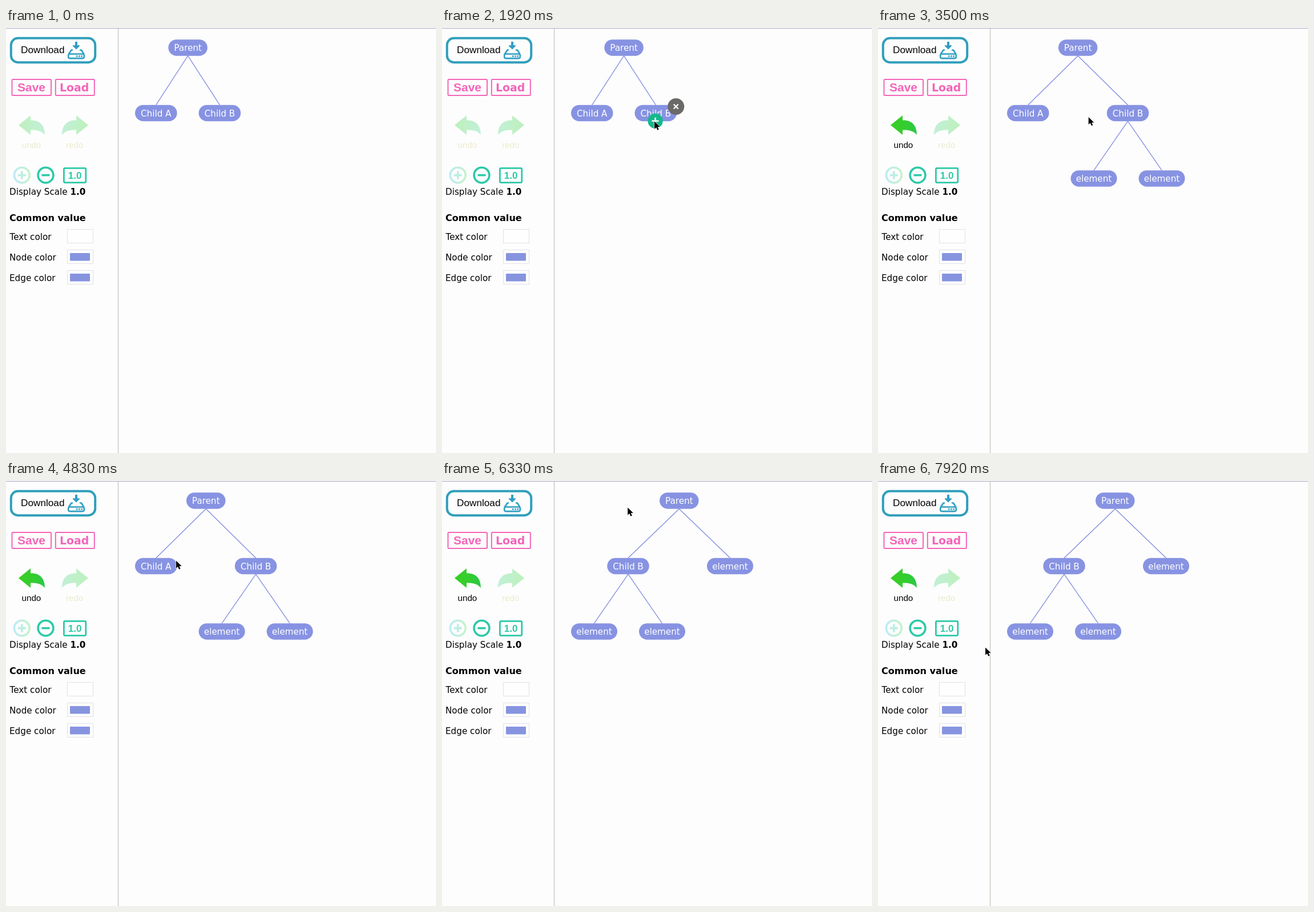
Animation of 753x744 px, one loop 8000 ms. Source, as an HTML page:

```html
<!DOCTYPE html>
<html lang="en">
<head>
<meta charset="utf-8">
<title>Tree editor</title>
<style>
  html, body { margin: 0; width: 100%; height: 100%; overflow: hidden; background: #fdfdfd; }
  svg { display: block; width: 100vw; height: 100vh; }
  text { font: 15.2px "DejaVu Sans", sans-serif; }
  .sans { font-family: "Liberation Sans", sans-serif; }
  .bold { font-weight: bold; }
  .mid { text-anchor: middle; }
  .line { fill: none; }
</style>
</head>
<body>
<svg viewBox="0 0 753 744">
  <defs>
    <linearGradient id="leaf">
      <stop offset="0" stop-color="#38cf22"/>
      <stop offset=".55" stop-color="#33cd2e"/>
      <stop offset="1" stop-color="#2cc848"/>
    </linearGradient>
    <linearGradient id="pale">
      <stop offset="0" stop-color="#bdf0bb"/>
      <stop offset="1" stop-color="#c2f0d8"/>
    </linearGradient>
    <linearGradient id="mist">
      <stop offset="0" stop-color="#bdebf5"/>
      <stop offset="1" stop-color="#c4f2c9"/>
    </linearGradient>
    <path id="bend" d="M22 170L43 153V161.5C58 161 68 169 68 187C62 180 54 178 43 178.5V187Z"/>
  </defs>
  <rect width="753" height="744" fill="#fdfdfd"/>
  <path d="M0 .5H753" stroke="#aaa8d0"/>
  <path d="M196.5 0V744" stroke="#b9b9b0"/>

  <rect class="line" x="8.8" y="17.8" width="147.4" height="42.4" rx="12" stroke="#309fbb" stroke-width="4"/>
  <text class="sans" x="26" y="44" style="font-size:17.2px">Download</text>
  <g class="line" stroke="#309fc4" stroke-width="2.6" stroke-linejoin="round">
    <path d="M123 24V32" stroke-width="4"/>
    <path d="M117.5 31H128.5L123 36.5Z" fill="#309fc4" stroke-width="1.5"/>
    <path d="M117 38.5H114.5L109.5 46M129 38.5H132L136.5 46"/>
    <rect x="109.2" y="45.5" width="27.6" height="7.6" rx="2.5"/>
    <path d="M123 49.4H125.5M127.2 49.4H129.7M131.4 49.4H133.9"/>
  </g>

  <g class="line" stroke="#f565b8" stroke-width="2">
    <rect x="10.5" y="90" width="68.5" height="28" rx="1.5"/>
    <rect x="86.8" y="90" width="68" height="28" rx="1.5"/>
  </g>
  <g fill="#f565b8">
    <text class="sans bold" x="20" y="111" style="font-size:21px">Save</text>
    <text class="bold" x="94" y="111" style="font-size:18.9px">Load</text>
  </g>

  <use id="undoIcon" href="#bend"/>
  <text id="undoText" class="sans" x="27.5" y="210">undo</text>
  <use href="#bend" transform="matrix(-1 0 0 1 166 0)" fill="url(#pale)"/>
  <text class="sans" x="105" y="210" fill="#ecebcb">redo</text>

  <g class="line" stroke-width="3.6">
    <circle cx="27.8" cy="257.6" r="13.4" stroke="url(#mist)"/>
    <path d="M20.8 257.6H34.8M27.8 250.6V264.6" stroke="#bdeee4"/>
    <g stroke="#2cc9a8">
      <circle cx="69.5" cy="257.6" r="13.4"/>
      <path d="M62.5 257.6H76.5"/>
      <rect x="101.4" y="245.4" width="38.4" height="25.2" rx="2" stroke-width="2.8"/>
    </g>
  </g>
  <text class="sans bold mid" x="120.6" y="263.6" fill="#2cc9a8" style="font-size:17px">1.0</text>
  <text x="6" y="292">Display Scale <tspan class="bold">1.0</tspan></text>

  <text class="bold" x="6" y="337.5" style="font-size:16.1px">Common value</text>
  <text x="6.5" y="371">Text color</text>
  <text x="6" y="407">Node color</text>
  <text x="6" y="443.3">Edge color</text>
  <g fill="#fefefe" stroke="#e1e1e8">
    <rect x="107.5" y="352.5" width="45" height="24"/>
    <rect x="107.5" y="388.5" width="45" height="24"/>
    <rect x="107.5" y="424.5" width="45" height="24"/>
  </g>
  <g fill="#8694e0">
    <rect x="112" y="394" width="35" height="13.5" rx="1"/>
    <rect x="112" y="430" width="35" height="13.5" rx="1"/>
  </g>
  <g id="tree"></g>
  <g id="pointer"></g>
</svg>
<script>
const LOOP = 8000, FPS = 12;
const COLOR = '#8793e2', EDGE = '#7f8adf';
const GAP = 38, LEFT = 226, TOP = 20.2, STEP = 114.5, HEIGHT = 28.5;
const WIDTH = { Parent: 68.5, 'Child A': 73.5, 'Child B': 73.5, element: 81 };
const $ = id => document.getElementById(id);

const node = (label, ...kids) => ({ label, kids });
const leaf = () => node('element');
const A = () => node('Child A');
const B = (...kids) => node('Child B', ...kids);

// Each edit swaps the whole tree.
const scenes = [
  [0, node('Parent', A(), B())],
  [2910, node('Parent', A(), B(leaf()))],
  [3245, node('Parent', A(), B(leaf(), leaf()))],
  [5330, node('Parent', B(leaf(), leaf()))],
  [6330, node('Parent', B(leaf(), leaf()), leaf())]
];
const hovers = [
  [1830, 3245, 'Child B'], [4910, 5330, 'Child A'],
  [5330, 5410, 'Child B'], [5910, 6330, 'Parent']
];
const focus = [[2580, 3245], [6245, 6330]];
const hands = [[2080, 3245], [5160, 5330], [6080, 6330]];
const path = [
  [80, 612, 538], [830, 454, 332], [1170, 387, 271], [1670, 378, 190],
  [2080, 370, 156], [3400, 370, 156], [4300, 318, 150], [4830, 298, 139.5],
  [5000, 291, 146], [5160, 299, 139], [5330, 299, 138], [5670, 308.5, 79.5],
  [6080, 324, 46], [6450, 326, 47], [7000, 463, 278.5], [7500, 376, 297], [7920, 188, 291.5]
];

function layout(n, left = LEFT, depth = 0) {
  n.w = WIDTH[n.label];
  n.y = TOP + depth * STEP;
  let x = left;
  for (const kid of n.kids) x = layout(kid, x, depth + 1) + GAP;
  const first = n.kids[0], last = n.kids[n.kids.length - 1];
  n.cx = first ? (first.cx + last.cx) / 2 : left + n.w / 2;
  return Math.max(x - GAP, left + n.w);
}
scenes.forEach(s => layout(s[1]));

const during = (list, t) => list.find(([a, b]) => t >= a && t < b);

function drawNode(n) {
  const edges = n.kids.map(k =>
    `<path d="M${n.cx} ${n.y + HEIGHT}L${k.cx} ${k.y}" stroke="${EDGE}" stroke-width="1.25"/>`).join('');
  return `${edges}<rect x="${n.cx - n.w / 2}" y="${n.y}" width="${n.w}" height="${HEIGHT}" rx="14.2" fill="${COLOR}"/>
    <text class="mid" x="${n.cx}" y="${n.y + 19.8}" fill="#fff">${n.label}</text>${n.kids.map(drawNode).join('')}`;
}

function find(n, label) {
  if (n.label === label) return n;
  for (const kid of n.kids) {
    const hit = find(kid, label);
    if (hit) return hit;
  }
}

function drawButtons(n, ring) {
  const frame = '<rect x="-14" y="-14" width="28" height="28" rx="1.5" fill="#fdfdfd" stroke="#1f50b8" stroke-width="2"/>';
  return `<g transform="translate(${n.cx + n.w / 2 - 1.3} ${n.y + 2.8})">
      <circle r="14.5" fill="#6a6b69"/><path d="M-4-4L4 4M4-4L-4 4" stroke="#fff" stroke-width="2.4"/></g>
    <g transform="translate(${n.cx - .7} ${n.y + HEIGHT - .5})">${ring ? frame : ''}
      <circle r="13.2" fill="#16b98c"/><path d="M-6 0H6M0-6V6" stroke="#fff" stroke-width="2.6"/></g>`;
}

// Monotone cubic through the pointer stops.
function slope(i, c) {
  const [p, q, r] = [path[i - 1], path[i], path[i + 1]];
  if (!p || !r) return 0;
  const a = (q[c] - p[c]) / (q[0] - p[0]), b = (r[c] - q[c]) / (r[0] - q[0]);
  return a * b > 0 ? 2 * a * b / (a + b) : 0;
}
function pointerAt(t) {
  let i = 0;
  while (i < path.length - 2 && t >= path[i + 1][0]) i++;
  const p = path[i], q = path[i + 1], d = q[0] - p[0];
  const u = Math.min(1, Math.max(0, (t - p[0]) / d)), v = 1 - u;
  return [1, 2].map(c =>
    v * v * (1 + 2 * u) * p[c] + u * u * (3 - 2 * u) * q[c] +
    d * u * v * (v * slope(i, c) - u * slope(i + 1, c)));
}

const ARROW = '<path d="M0 0V13.2L3.1 10.4L5.2 15.2L7.6 14.1L5.5 9.5H9.7Z" fill="#000" stroke="#fff" stroke-width="1.2" paint-order="stroke"/>';
const HAND = '<path d="M-1.5 1Q0-1 1.5 1V6Q3 4.8 4.3 6.3Q6 5.4 7 7Q9 6.3 9.5 8.5V11Q9 13 8 14.5V17H0V15.5L-5 10.5Q-6 8-3.8 8L-1.5 9.8Z" fill="#fff" stroke="#111" stroke-width="1.1"/><path d="M2 11V14M4.2 11V14M6.4 11V14" stroke="#111" stroke-width=".8"/>';

function draw(t) {
  const tree = scenes.filter(s => t >= s[0]).pop()[1];
  const hover = during(hovers, t);
  $('tree').innerHTML = drawNode(tree) +
    (hover ? drawButtons(find(tree, hover[2]), during(focus, t)) : '');

  const edited = t >= scenes[1][0];
  $('undoIcon').setAttribute('fill', edited ? 'url(#leaf)' : 'url(#pale)');
  $('undoText').setAttribute('fill', edited ? '#000' : '#ecebcb');

  $('pointer').innerHTML = t < 80 ? '' :
    `<g transform="translate(${pointerAt(t)})">${during(hands, t) ? HAND : ARROW}</g>`;
}

let shown = -1;
const start = performance.now();
function tick() {
  const t = (performance.now() - start) % LOOP;
  const step = Math.floor((t + 4) * FPS / 1000) % (LOOP * FPS / 1000);
  if (step !== shown) draw((shown = step) * 1000 / FPS);
  requestAnimationFrame(tick);
}
tick();
</script>
</body>
</html>
```
